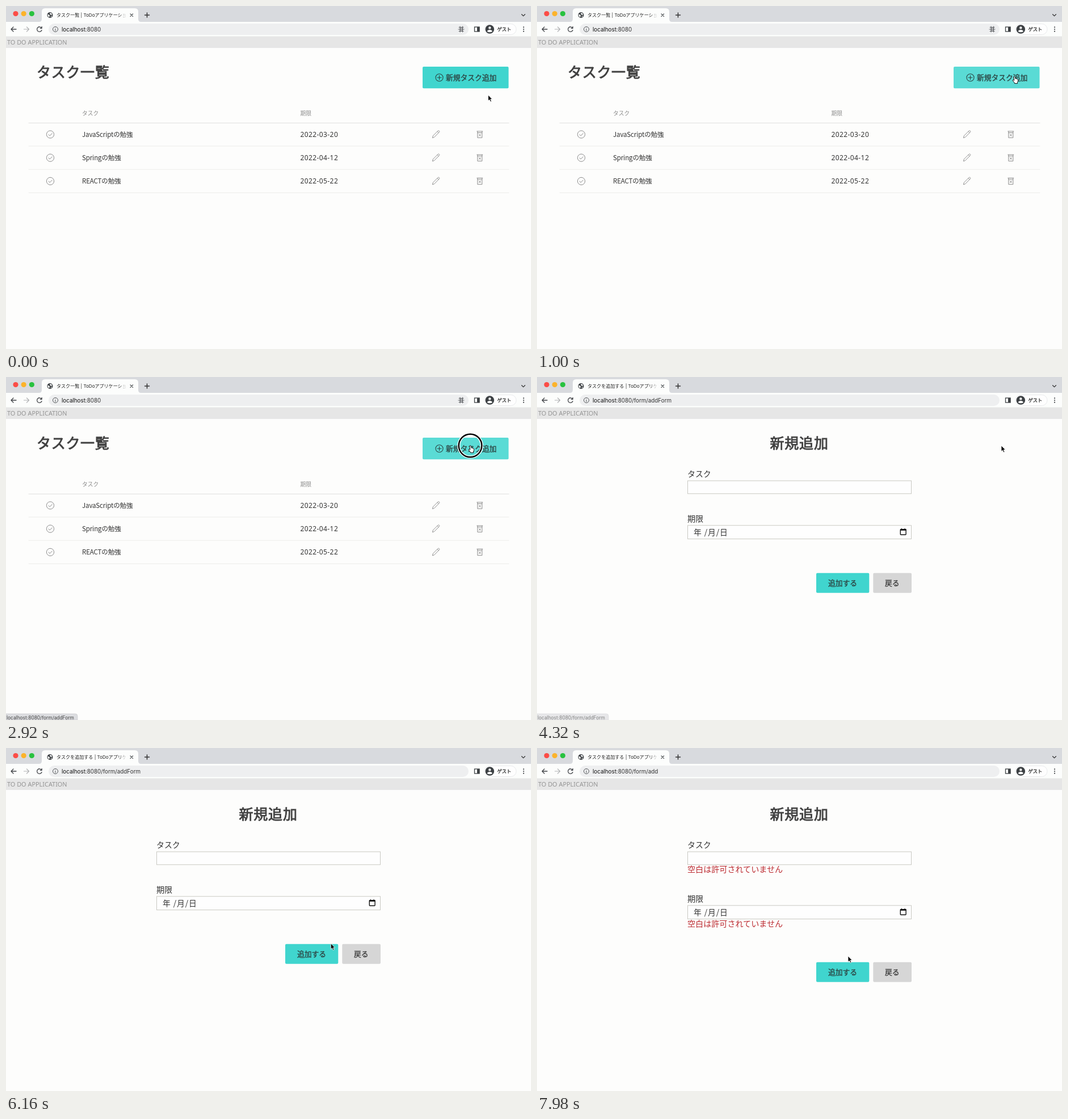
Write an HTML page that moves like this. It is 925x605 px and loops after 8000 ms.

```html
<!DOCTYPE html>
<html lang="ja">
<head>
<meta charset="utf-8">
<title>ToDo</title>
<style>
  html, body { margin: 0; width: 100%; height: 100%; overflow: hidden; background: #fdfdfc; }
  svg { display: block; width: 100vw; height: 100vh; }
  text { font-family: "Noto Sans CJK JP", "Noto Sans CJK", sans-serif; fill: currentColor; white-space: pre; }
  .ui { font-family: Inter, "Noto Sans CJK JP", sans-serif; }
  .num { font-family: "Noto Sans", sans-serif; }
  .mid { stroke: currentColor; stroke-width: .35; }
  .head { stroke: currentColor; stroke-width: .9; }
  .line { fill: none; stroke-linecap: round; stroke-linejoin: round; }
</style>
</head>
<body>
<svg viewBox="0 0 925 605" xmlns="http://www.w3.org/2000/svg">
  <defs>
    <linearGradient id="fade"><stop offset=".9" stop-color="#fff"/><stop offset="1" stop-color="#fff" stop-opacity="0"/></linearGradient>
    <mask id="titleMask" maskUnits="userSpaceOnUse" x="88" y="6" width="124" height="20">
      <rect x="88" y="6" width="124" height="20" fill="url(#fade)"/>
    </mask>
  </defs>
  <rect width="925" height="605" fill="#fdfdfc"/>
  <g id="chrome"></g>
  <g id="list"></g>
  <g id="form"></g>
  <g id="status">
    <path d="M0 594H122Q126 594 126 598V605H0Z" fill="#dcdde0" stroke="#c6c7c9" stroke-width=".6"/>
    <text class="ui" x="1" y="604" font-size="8.4" color="#444">localhost:8080/form/addForm</text>
  </g>
  <g id="ring" fill="none">
    <circle r="20.3" stroke="#fff" stroke-width="5"/>
    <circle r="20.3" stroke="#000" stroke-width="2.4"/>
  </g>
  <g id="cursor">
    <path id="arrow" d="M0 0V10.3L2.4 8.2L4.1 12L5.9 11.2L4.2 7.5H7.3Z" fill="#000" stroke="#fff" stroke-width=".8"/>
    <path id="hand" d="M-1.2 .9Q-.9-.4.2-.1Q1 .1 1.2 1.2L1.9 4.2Q2.6 3.5 3.4 4.4Q4.3 3.8 5 4.9Q6.4 4.6 6.5 6.2Q6.8 8.8 5.5 10.5V12.6H.3V11.3Q-1.8 9.2-3 7.1Q-3 5.8-1.5 6.3L-.2 7.3Z" fill="#fff" stroke="#111" stroke-width="1" stroke-linejoin="round"/>
  </g>
</svg>
<script>
const $ = id => document.getElementById(id);
const LOOP = 8000, TEAL = '#40d5ce', HOVER = '#5adbd5', INK = '#333';

const label = (x, y, size, str, cls = '', color = INK, gap = 0, extra = '') =>
  `<text x="${x}" y="${y}" font-size="${size}" class="${cls}" letter-spacing="${gap}" color="${color}" ${extra}>${str}</text>`;
const box = (x, y, w, h, fill, r = 0, extra = '') =>
  `<rect x="${x}" y="${y}" width="${w}" height="${h}" rx="${r}" fill="${fill}" ${extra}/>`;
const line = (d, color, width = 1) =>
  `<path class="line" d="${d}" stroke="${color}" stroke-width="${width}"/>`;
const dot = (x, y, r, fill, extra = '') =>
  `<circle cx="${x}" cy="${y}" r="${r}" fill="${fill}" ${extra}/>`;
const ringed = (x, y, r, color, width = 1) =>
  dot(x, y, r, 'none', `stroke="${color}" stroke-width="${width}"`);

function drawChrome() {
  const dark = '#3c4043';
  $('chrome').innerHTML = [
    box(0, 0, 925, 28, '#d8dade'),
    '<path d="M58 28Q63 28 63 23V10Q63 4 69 4H227Q233 4 233 10V23Q233 28 238 28Z" fill="#fcfdfc"/>',
    ...['#fb4d47', '#fcb32b', '#28c23f'].map((c, i) => dot(17 + 14.2 * i, 13.5, 4.6, c)),
    dot(77.5, 16, 5, dark),
    '<path d="M73.7 14.5Q76.5 15 77.2 17L75.8 19.7Q73 18 73.7 14.5ZM77 12.2L80 12.7L81.3 15.2L79 15.8L77.6 14.5ZM79 17.4L81 17.2L79 19.9Z" fill="#fcfdfc"/>',
    '<g mask="url(#titleMask)">' + label(89, 19, 8.05, '', 'ui', '#222', 0, 'id="tabTitle"') + '</g>',
    line('M219 13.8L223.6 18.4M223.6 13.8L219 18.4', dark, 1.2),
    line('M244.5 16H252.5M248.5 12V20', INK, 1.5),
    line('M908.6 14.8L911.5 17.6L914.4 14.8', INK, 1.3),
    box(0, 28, 925, 26, '#fcfdfc'),
    box(75, 31, 740, 20, '#eeeff0', 10),
    line('M18 41H9M13 37L9 41L13 45', '#404347', 1.3),
    line('M31.5 41H40.5M36.5 37L40.5 41L36.5 45', '#b0b2b4', 1.2),
    line('M62.6 38.8A4.3 4.3 0 1 0 63 42.5M63.1 36.4V39.3H60.2', '#404347', 1.3),
    ringed(87, 41, 4.5, '#505356'),
    line('M87 40.8V43.3M87 38.7V38.8', '#505356', 1.1),
    label(98, 44.6, 9.8, '<tspan color="#111">localhost</tspan><tspan id="urlTail" color="#333"></tspan>', 'ui'),
    '<g id="translate">',
    line('M798 37.5H806M798 44.5H806M800 36V46M804.5 36V46M797 41H807', '#606367'),
    box(800.5, 39, 3.5, 4, 'none', 0, 'stroke="#606367" stroke-width=".8"'),
    '</g>',
    box(825.5, 37, 8.6, 8, 'none', 0, 'stroke="#3c4043" stroke-width="1.3"'),
    box(830, 37, 4, 8, dark),
    box(843, 31.5, 56, 19, '#fefefe', 9.5, 'stroke="#e4e5e7" stroke-width=".8"'),
    dot(852.3, 41, 7.8, dark),
    dot(852.3, 38.4, 2.2, '#fff'),
    '<path d="M847.7 45Q848.3 42 852.3 42T856.9 45Q852.3 47.5 847.7 45Z" fill="#fff"/>',
    label(865.5, 44.3, 8.2, 'ゲスト', 'mid'),
    ...[37.3, 41, 44.7].map(y => dot(912, y, 1.1, '#404347')),
    box(0, 53.5, 925, 20.5, '#e6e6e6'),
    label(2, 68.2, 10.9, 'TO DO APPLICATION', 'num', '#949494')
  ].join('');
}

function drawRow([name, date], i) {
  const y = 226.5 + 41.2 * i, gray = '#8c8c8c';
  return [
    ringed(78, y, 6.6, gray),
    line(`M75 ${y + .2}l2.2 2.2l4-4.2`, gray),
    label(134, y + 4.4, 11.5, name, '', INK, -.12),
    label(518.5, y + 4.4, 12, date, 'num', INK, .4),
    `<g transform="translate(757.5 ${y - .5})">`,
    line('M-6 6.2L-5.1 2.9L3.9-6.1Q4.9-6.7 5.9-5.6Q6.6-4.7 6-3.7L-2.7 5.2ZM2.5-4.7L4.8-2.4', gray, .95),
    `</g><g transform="translate(834.8 ${y})">`,
    line('M-5-5.5H5M-4-5.3V5.8H4V-5.3M-4-3H4M-1.7-.5L1.7 3M1.7-.5L-1.7 3', gray),
    '</g>',
    line(`M40 ${y + 20.5}H886`, '#ececea')
  ].join('');
}

function drawList() {
  const rows = [['JavaScriptの勉強', '2022-03-20'], ['Springの勉強', '2022-04-12'], ['REACTの勉強', '2022-05-22']];
  $('list').innerHTML = [
    label(54, 126, 25, 'タスク一覧', 'head', '#404040', .7),
    box(734, 107, 151.5, 38.3, TEAL, 2, 'id="newBtn"'),
    ringed(763.5, 126.2, 6.5, '#2c4543', 1.1),
    line('M760 126.2H767M763.5 122.7V129.7', '#2c4543', 1.1),
    label(775, 130.7, 12.75, '新規タスク追加', 'mid', '#2c4543'),
    label(134, 193, 9.75, 'タスク', '', '#8c8c8c'),
    label(518.5, 193, 9.75, '期限', '', '#8c8c8c'),
    line('M40 206.3H886', '#dfdfdf'),
    ...rows.map(drawRow)
  ].join('');
}

function drawForm() {
  const frame = 'stroke="#c9c9c2" stroke-width="1"', red = '#bc2a30', error = '空白は許可されていません';
  $('form').innerHTML = [
    label(410.5, 126, 25, '新規追加', 'head', '#404040', .8),
    label(265, 176, 13.9, 'タスク'),
    box(265.5, 183, 394, 22.8, '#fefefe', 0, frame),
    '<g id="dateRow">',
    label(265, 254.5, 14, '期限'),
    box(265.5, 261.8, 394, 23.8, '#fefefe', 0, frame),
    label(276, 278.6, 13.8, '年 /月/日', '', INK, .9),
    box(640.3, 268.6, 9.8, 9.6, 'none', 1, 'stroke="#111" stroke-width="1.4"'),
    box(640, 268, 10.4, 2.8, '#111'),
    line('M642.4 267.4V268M648 267.4V268', '#111', 1.2),
    '</g><g id="buttons">',
    box(492, 345.7, 93.3, 35.1, TEAL, 2, 'id="addBtn"'),
    label(513, 367.6, 12.75, '追加する', 'mid', '#2c4543'),
    box(592.3, 345.7, 67.7, 35.1, '#d6d6d6', 2),
    label(613, 367.6, 12.75, '戻る', 'mid', '#3c3c3c'),
    '</g><g id="errors">',
    label(265, 219.3, 14.08, error, '', red),
    label(265, 315.3, 14.08, error, '', red),
    '</g>'
  ].join('');
}

// time, x, y of the pointer tip
const path = [
  [0, 849.5, 157], [150, 849.5, 157], [820, 841, 124], [1700, 841, 124], [2500, 818, 121],
  [4600, 818, 121], [5440, 652.5, 249], [5640, 645, 262], [6400, 550, 370],
  [6750, 548, 367], [8000, 548, 367]
];
const clicks = [[2840, 3040], [7180, 7380]];
const LIST_END = 3500, ERROR_AT = 7580;

const ramp = (t, a, b) => Math.min(1, Math.max(0, (t - a) / (b - a)));
const show = (id, on) => $(id).style.display = on ? '' : 'none';
const inside = ([x, y], l, top, r, bottom) => x >= l && x <= r && y >= top && y <= bottom;

function pointer(t) {
  const i = path.findIndex(p => p[0] > t);
  const [a, x, y] = path[i - 1], [b, u, v] = path[i];
  const k = ramp(t, a, b), e = k * k * (3 - 2 * k);
  return [x + (u - x) * e, y + (v - y) * e];
}

function render(t) {
  const p = pointer(t), list = t < LIST_END, failed = t >= ERROR_AT;
  const overNew = list && inside(p, 734, 107, 886, 145);
  const overAdd = !list && !failed && inside(p, 492, 346, 585, 381);
  const overDate = !list && !failed && inside(p, 636, 246, 656, 282);
  const hand = overNew || overAdd || overDate;

  show('list', list);
  show('form', !list);
  show('translate', list);
  show('errors', failed);
  $('dateRow').setAttribute('transform', `translate(0 ${failed ? 16 : 0})`);
  $('buttons').setAttribute('transform', `translate(0 ${failed ? 32 : 0})`);
  $('newBtn').setAttribute('fill', overNew ? HOVER : TEAL);
  $('addBtn').setAttribute('fill', overAdd ? HOVER : TEAL);
  $('tabTitle').textContent = (list ? 'タスク一覧' : 'タスクを追加する') + ' | ToDoアプリケーション';
  $('urlTail').textContent = ':8080' + (list ? '' : failed ? '/form/add' : '/form/addForm');

  $('status').style.opacity = ramp(t, 1500, 1660) * (1 - ramp(t, 4200, 4560));
  const place = `translate(${p[0]} ${p[1]})`;
  $('cursor').setAttribute('transform', place);
  $('ring').setAttribute('transform', place);
  show('hand', hand);
  show('arrow', !hand);
  show('ring', clicks.some(([a, b]) => t >= a && t < b));
}

drawChrome();
drawList();
drawForm();
const start = performance.now();
function tick() {
  render((performance.now() - start) % LOOP);
  requestAnimationFrame(tick);
}
tick();
</script>
</body>
</html>
```
